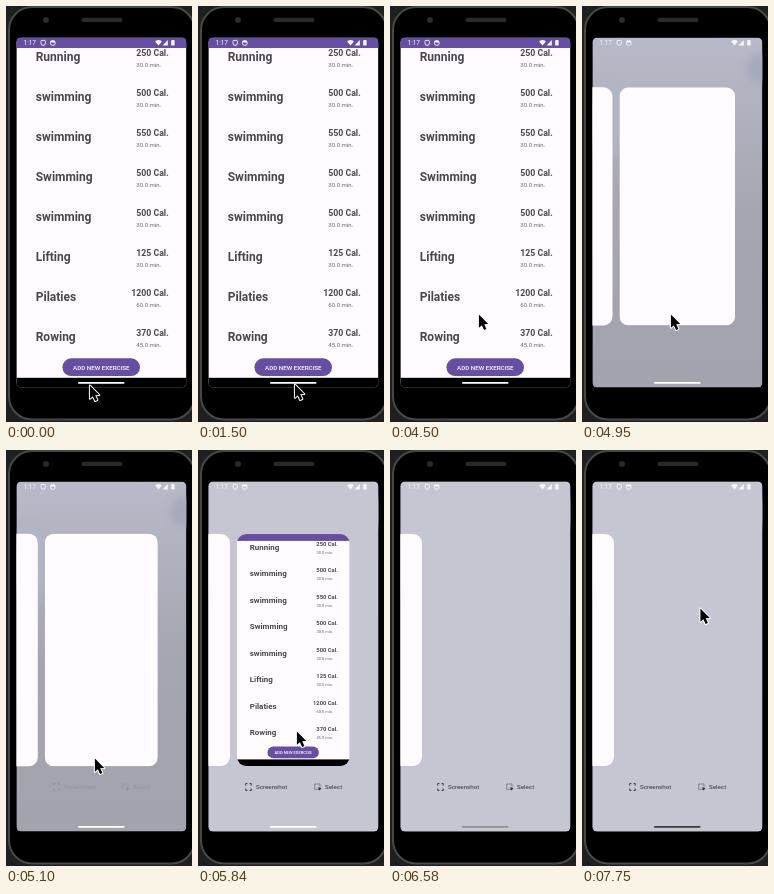
Write an HTML page with a canvas that moves like this. It is 186x416 px and loops after 8 s.

```html
<!DOCTYPE html>
<html lang="en">
<head>
<meta charset="utf-8">
<title>Closing an app from the recents screen</title>
<style>
html, body { margin: 0; width: 100%; height: 100%; overflow: hidden; background: #242526; }
canvas { display: block; width: 186px; height: 416px; }
</style>
</head>
<body>
<canvas id="stage"></canvas>
<script>
const W = 186, H = 416, LOOP = 8000;
const RECENTS_AT = 4650, DRAG_AT = 5834, DISMISSED_AT = 6560, RETURN_AT = 7150;
const SCREEN = { x: 10.4, y: 31.6, w: 170, h: 350 };
const PURPLE = '#664fa3', PAPER = '#fffbfe', INK = '#4a464e', LAVENDER = '#c6c5d2';
const EXERCISES = [
  ['Running', 250], ['swimming', 500], ['swimming', 550], ['Swimming', 500],
  ['swimming', 500], ['Lifting', 125], ['Pilaties', 1200, 60], ['Rowing', 370, 45]
];

const canvas = document.getElementById('stage');
const ctx = canvas.getContext('2d');
const ratio = window.devicePixelRatio || 1;
canvas.width = W * ratio;
canvas.height = H * ratio;

const mix = (a, b, p) => a + (b - a) * p;
const ramp = (t, from, to) => Math.min(1, Math.max(0, (t - from) / (to - from)));
const easeOut = (p, power = 2) => 1 - (1 - p) ** power;

function quantise(t) {
  return t < 5540 ? Math.floor(t / 150) * 150 : 5540 + Math.floor((t - 5540) / 147.3) * 147.3;
}

const dragLift = t => 18 * easeOut(ramp(t, DRAG_AT, 6423));

function pointerAt(t) {
  if (t > RETURN_AT) return [117.5, mix(2, 157, ramp(t, RETURN_AT, 7745))];
  const moves = [
    { from: 150, to: 600, x: 83, y: 367 },
    { from: 1050, to: 1500, x: 96, y: 377 },
    { from: 1800, to: 2100, x: 97, y: 312 },
    { from: 3000, to: 3150, x: 97, y: 318 },
    { from: 3150, to: 3600, x: 92, y: 387 },
    { from: 3900, to: 4500, x: 88, y: 307 },
    { from: 5100, to: DRAG_AT, x: 98, y: 280 }
  ];
  let x = 83, y = 378;
  for (const move of moves) {
    const p = ramp(t, move.from, move.to);
    x = mix(x, move.x, p);
    y = mix(y, move.y, p);
  }
  return [x, y - dragLift(t)];
}

function roundPath(x, y, w, h, r) {
  ctx.beginPath();
  ctx.roundRect(x, y, w, h, r);
}

function pill(x, y, w, h, r, fill) {
  roundPath(x, y, w, h, r);
  ctx.fillStyle = fill;
  ctx.fill();
}

function rect(x, y, w, h, fill) {
  ctx.fillStyle = fill;
  ctx.fillRect(x, y, w, h);
}

function polygon(points, fill) {
  ctx.beginPath();
  points.forEach(([x, y]) => ctx.lineTo(x, y));
  ctx.closePath();
  ctx.fillStyle = fill;
  ctx.fill();
}

function blob(x, y, rx, ry, fill) {
  ctx.beginPath();
  ctx.ellipse(x, y, rx, ry, 0, 0, Math.PI * 2);
  ctx.fillStyle = fill;
  ctx.fill();
}

function label(text, x, y, size, weight, fill, align = 'left') {
  ctx.font = `${weight} ${size}px Roboto, sans-serif`;
  ctx.textAlign = align;
  ctx.fillStyle = fill;
  ctx.fillText(text, x, y);
}

function drawPhone() {
  rect(0, 0, W, H, '#1e1f20');
  roundPath(3, 1, 185.5, 412.5, 23);
  ctx.fillStyle = '#000';
  ctx.fill();
  ctx.strokeStyle = '#48494b';
  ctx.lineWidth = 2;
  ctx.stroke();
  pill(75.5, 11.7, 41, 4.4, 2.2, '#2a2a2b');
  blob(40, 14, 2.9, 2.9, '#2b2b30');
}

function drawStatus(alpha) {
  ctx.save();
  ctx.globalAlpha = alpha;
  label('1:17', 17.6, 39.2, 6.4, 400, '#fff');
  ctx.strokeStyle = '#fff';
  ctx.lineWidth = .9;
  roundPath(35, 34.4, 4.4, 5, [1, 1, 2.2, 2.2]);
  ctx.stroke();
  roundPath(44.4, 34.6, 4.8, 4.8, 2.2);
  ctx.stroke();
  rect(44.6, 34.8, 4.4, 1.7, '#fff');
  ctx.fillStyle = '#fff';
  ctx.beginPath();
  ctx.moveTo(152.5, 39.5);
  ctx.arc(152.5, 39.5, 5.3, -Math.PI * .72, -Math.PI * .28);
  ctx.fill();
  polygon([[161.8, 34], [161.8, 39.5], [156.5, 39.5]], '#fff');
  pill(165.2, 34, 3.4, 5.6, .8, '#fff');
  ctx.restore();
}

function drawApp(contentAlpha) {
  const { x, y, w, h } = SCREEN;
  rect(x, y, w, h, PAPER);
  ctx.save();
  ctx.globalAlpha = contentAlpha;
  EXERCISES.forEach(([name, calories, minutes = 30], i) => {
    const top = i * 40;
    label(name, 29.7, 55.4 + top, 12, 700, INK);
    label(`${calories} Cal.`, 162.7, 49.6 + top, 8.75, 700, INK, 'right');
    label(`${minutes}.0 min.`, 130.3, 61 + top, 6.05, 400, '#69656d');
  });
  rect(x, y, w, 42 - y, PURPLE);
  pill(56.4, 352.3, 77.6, 17.8, 8.9, PURPLE);
  label('ADD NEW EXERCISE', 95.3, 363.6, 6.2, 500, '#fff', 'center');
  rect(x, 371.8, w, 11, '#000');
  ctx.restore();
}

function drawWallpaper(scrim) {
  const { x, y, w, h } = SCREEN;
  const sky = ctx.createLinearGradient(0, y, 0, y + h);
  sky.addColorStop(0, '#b9bac9');
  sky.addColorStop(.5, '#a5a6b1');
  sky.addColorStop(1, '#a3a3ae');
  rect(x, y, w, h, sky);
  ctx.save();
  ctx.filter = 'blur(4px)';
  blob(178, 62, 14, 15, '#a4aabb');
  blob(24, 116, 16, 40, '#adb6c8');
  ctx.restore();
  ctx.globalAlpha = scrim;
  rect(x, y, w, h, LAVENDER);
  ctx.globalAlpha = 1;
}

function drawActions(alpha) {
  const ink = '#302f38';
  ctx.save();
  ctx.globalAlpha = alpha;
  ctx.strokeStyle = ink;
  ctx.lineWidth = 1;
  ctx.beginPath();
  for (const sx of [-1, 1]) for (const sy of [-1, 1]) {
    ctx.moveTo(50.5 + sx * 1.2, 337 + sy * 3.5);
    ctx.lineTo(50.5 + sx * 2.7, 337 + sy * 3.5);
    ctx.lineTo(50.5 + sx * 2.7, 337 + sy * 1.5);
  }
  ctx.stroke();
  ctx.lineWidth = .7;
  ctx.setLineDash([1.2, .8]);
  ctx.strokeRect(116.7, 334, 5.4, 5.4);
  polygon([[120, 337], [123.4, 338.4], [121.3, 340.6]], ink);
  label('Screenshot', 58, 339.3, 6.25, 400, ink);
  label('Select', 127, 339.3, 6.25, 400, ink);
  ctx.restore();
}

function drawRecents(t) {
  const { x, y, w, h } = SCREEN;
  const open = easeOut(ramp(t, 4450, 5250), 3);
  const scale = mix(1, .6625, open);
  const left = 95.3 - w * scale / 2;
  const top = mix(206.6, 200, open) - h * scale / 2;
  const held = t < DISMISSED_AT;
  const content = Math.max(1 - ramp(t, 4800, 4950), ramp(t, 5250, 5540));
  const dimming = held ? 1 - .7 * ramp(t, DRAG_AT, 6129) : 1;

  drawWallpaper(ramp(t, 5100, 5540));
  drawActions(ramp(t, 4950, 5540) ** 1.4 * dimming);
  pill(left - 7 - w * scale, top, w * scale, h * scale, 9, PAPER);
  if (held) {
    ctx.save();
    ctx.translate(left, top - dragLift(t));
    ctx.scale(scale, scale);
    ctx.translate(-x, -y);
    roundPath(x, y, w, h, 9 / scale);
    ctx.clip();
    drawApp(content);
    ctx.restore();
  }
  drawStatus(.85);
}

function drawHandle(t) {
  const shade = Math.round(mix(255, 58, easeOut(ramp(t, 6423, 6863))));
  pill(72, 376, 46.5, 1.7, .8, `rgb(${shade}, ${shade}, ${shade + 4})`);
}

function drawPointer(x, y) {
  ctx.save();
  ctx.translate(x + .9, y + 1.5);
  ctx.lineJoin = 'round';
  ctx.strokeStyle = '#fff';
  ctx.lineWidth = 2;
  polygon([[0, 0], [0, 13.3], [3, 10.7], [5.2, 15.5], [7.5, 14.5], [5.3, 9.8], [9.4, 9.6]], '#000');
  ctx.stroke();
  ctx.fill();
  ctx.restore();
}

function draw(now) {
  const t = quantise(now % LOOP);
  const { x, y, w, h } = SCREEN;
  ctx.setTransform(ratio, 0, 0, ratio, 0, 0);
  drawPhone();
  ctx.save();
  roundPath(x, y, w, h, 5);
  ctx.clip();
  if (t < RECENTS_AT) {
    drawApp(1);
    drawStatus(.95);
  } else {
    drawRecents(t);
  }
  drawHandle(t);
  ctx.restore();
  if (t < DISMISSED_AT || t > RETURN_AT) drawPointer(...pointerAt(t));
}

const start = performance.now();
function frame() {
  draw(performance.now() - start);
  requestAnimationFrame(frame);
}
frame();
</script>
</body>
</html>
```
